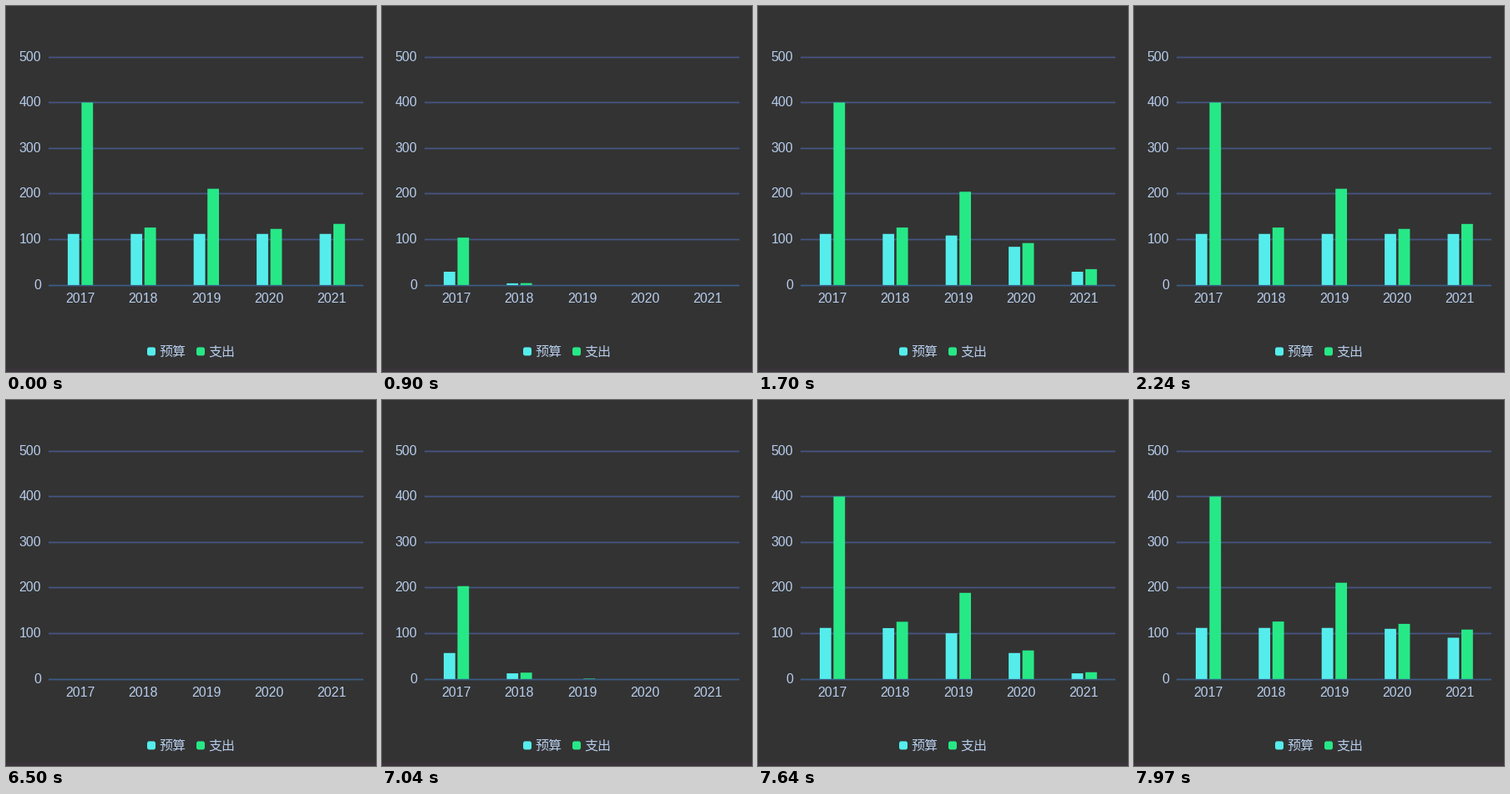
Recreate the animation shown at these times as a matplotlib script. Size 443x438 px, loop 8 s.

```python
import math

import matplotlib.pyplot as plt
from matplotlib.animation import FuncAnimation
from matplotlib.patches import FancyBboxPatch, Rectangle

W, H, DPI = 443, 438, 64
LOOP, STEP = 8000, 20
PX = 72 / DPI                      # points per pixel

BACK, FOOT = "#333333", "#39333a"
GRID, AXIS, INK = "#455682", "#3b5c86", "#b6cceb"
CYAN, GREEN = "#55edec", "#27e887"

LEFT, RIGHT, BASE, UNIT = 51, 428, 333.9, 0.546
SLOT = (RIGHT - LEFT) / 5
BAR = 13.8
YEARS = range(2017, 2022)
BUDGET = [112] * 5
SPENT = [400, 126, 211, 123, 134]

FIRST, CLEAR = 500, 6500           # moments when the bars are emptied
STARTS = (498, 6530)               # when each growth begins
GROW, DELAY, TICK = 1000, 200, 1000 / 15

fig = plt.figure(figsize=(W / DPI, H / DPI), dpi=DPI, facecolor=BACK)
ax = fig.add_axes([0, 0, 1, 1])
ax.set_xlim(0, W)
ax.set_ylim(H, 0)
ax.axis("off")


def label(x, y, text, align, font="Liberation Sans"):
    ax.text(x, y, text, color=INK, ha=align, va="baseline",
            family=font, size=16 * PX)


def rule(y, color):
    ax.plot([LEFT, RIGHT], [y, y], color=color, lw=1.8 * PX,
            solid_capstyle="butt", snap=False, zorder=1)


def legend(x, color, text):
    ax.add_patch(FancyBboxPatch((x + 2, 410.4), 6, 6, color=color, lw=0,
                                boxstyle="round,pad=2,rounding_size=2.5"))
    label(x + 14.5, 418.5, text, "left", "Noto Sans CJK JP")


def make_bars(offset, color):
    bars = []
    for i in range(5):
        bar = Rectangle((LEFT + SLOT * i + offset, BASE), BAR, 0,
                        color=color, lw=0, snap=False, zorder=2)
        bars.append(ax.add_patch(bar))
    return bars


def ease(t):
    t = min(max(t, 0), 1)
    return 4 * t ** 3 if t < 0.5 else 1 - 4 * (1 - t) ** 3


def growth(ms, i):
    if ms < FIRST:
        return 1
    start = STARTS[0] if ms < CLEAR else STARTS[1]
    return ease((ms - start - DELAY * i) / GROW)


ax.add_patch(Rectangle((0, 434), W, 4, color=FOOT, lw=0))
for k in range(6):
    y = math.floor(334.02 - UNIT * 100 * k) + 0.5
    rule(y, GRID if k else AXIS)
    label(42, y + 4.3, str(100 * k), "right")
for i, year in enumerate(YEARS):
    label(LEFT + SLOT * (i + 0.5), 355.2, str(year), "center")
legend(169, CYAN, "预算")
legend(228, GREEN, "支出")

series = [(make_bars(22.9, CYAN), BUDGET), (make_bars(39.4, GREEN), SPENT)]


def draw(n):
    # bars move at 15 steps a second, counted from the first clearing
    ticks = math.floor((n * STEP + STEP / 2 - FIRST) / TICK)
    ms = FIRST + round(ticks * TICK)
    for bars, values in series:
        for i, (bar, value) in enumerate(zip(bars, values)):
            height = value * UNIT * growth(ms, i)
            bar.set_y(BASE - height)
            bar.set_height(height)
            bar.set_visible(height > 0.5)
    return [bar for bars, _ in series for bar in bars]


anim = FuncAnimation(fig, draw, frames=LOOP // STEP, interval=STEP,
                     repeat=True, repeat_delay=0)
plt.show()
```
